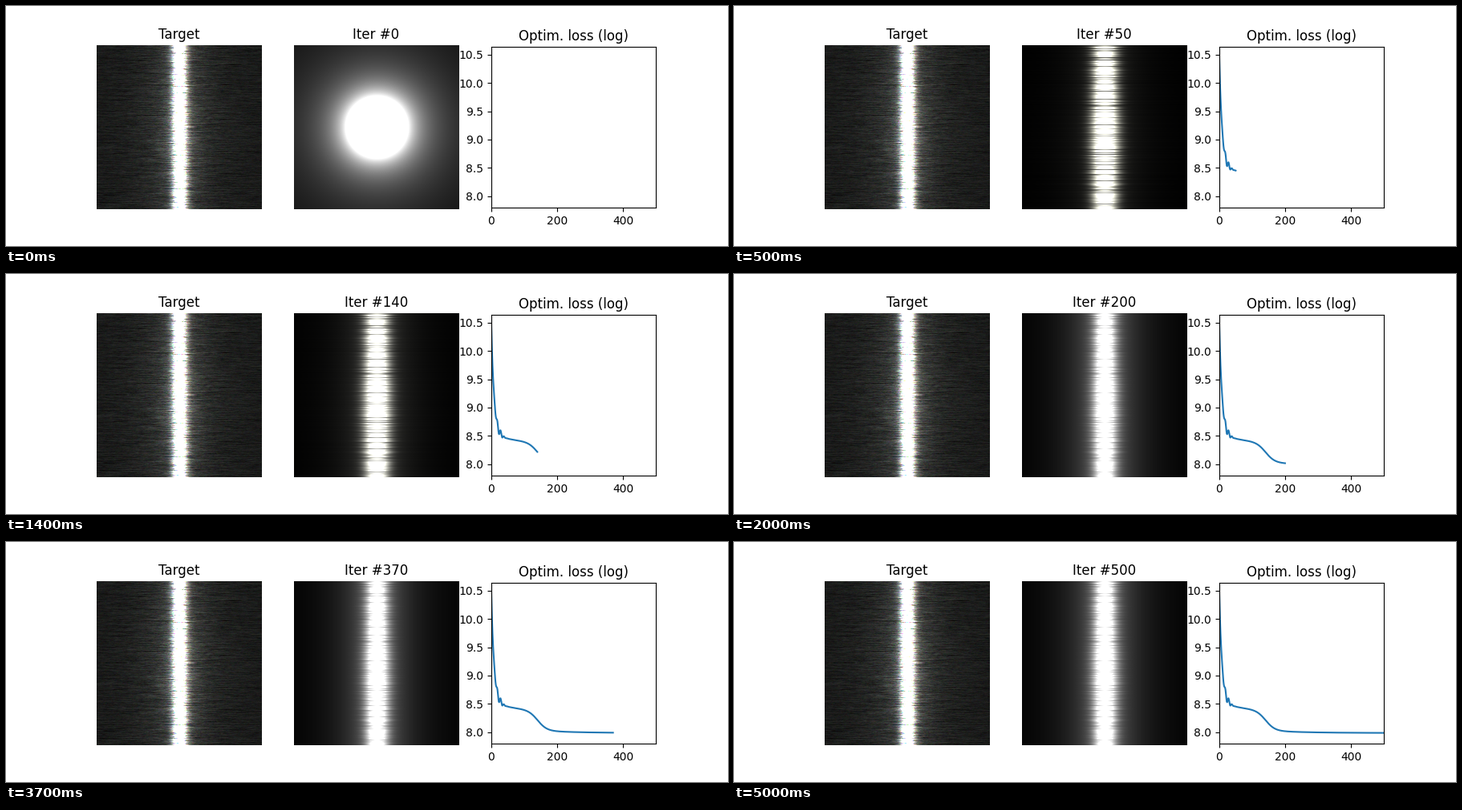
Write a matplotlib script that moves like this. It is 900x300 px and loops after 5.1 s.

```python
import numpy as np
import matplotlib.pyplot as plt
from matplotlib.animation import FuncAnimation

N = 205
FRAMES, STEP, INTERVAL = 51, 10, 100
BLUE = "#1f77b4"

rng = np.random.default_rng(7)
rows, cols = np.mgrid[0:N, 0:N].astype(float)
y = rows[:, :1]


def bell(x, spread):
    return np.exp(-(x / spread) ** 2)


def logistic(x):
    return 1 / (1 + np.exp(-x))


def streaks(length):
    """Unit-variance noise smeared along each row."""
    noise = rng.normal(size=(N, N + length - 1))
    kernel = np.ones(length) / np.sqrt(length)
    return np.array([np.convolve(r, kernel, "valid") for r in noise])


def brushed_target():
    """Brushed-metal highlight with streaks and faint coloured grain."""
    shade = 0.13 * streaks(20) + 0.08 * streaks(5)
    sway = 0.4 * rng.normal(size=(N, 1)) + 0.8 * (y / N - 0.5)
    hump = 0.85 + 0.3 * bell(y - 110, 60)
    channels = []
    for shift, tint in zip((0.2, 0, -0.2), (0.97, 1, 0.96)):
        d = np.abs(cols - 102.5 - sway - shift)
        glow = 0.095 + hump * (0.16 * np.exp(-d / 35) + 0.28 * np.exp(-d / 12))
        light = tint * glow + 1.2 * bell(d, 8)
        channels.append(light * (1 + shade + 0.08 * streaks(2)))
    return np.clip(np.dstack(channels), 0, 1)


# Grooves cut into the highlight: shallower and rarer around y = 118.
edge = np.clip(np.abs(y - 118) / 105, 0, 1)
depth = 0.9 * rng.random((N, 1)) ** (5 - 3.5 * edge)
width = 0.95 + 0.1 * bell(y - 120, 45) + 0.04 * rng.normal(size=(N, 1))


def render(it):
    """Highlight after `it` optimisation steps."""
    dx, dy = cols - 102.5, rows - 102.5
    d = np.abs(dx) / width
    soften = logistic((it - 150) / 12)
    groove = 1 - (0.95 - 0.3 * soften) * depth
    sharp = 1.6 * bell(d, 14) * groove + 0.22 * np.exp(-d / 30)
    soft = 1.0 * bell(d, 13) * groove + 0.55 * np.exp(-np.abs(dx) / 32)
    band = (1 - soften) * sharp + soften * soft

    # The round glow stretches upright while it gives way to the band.
    fade = np.exp(-it / 8)
    r = np.hypot(dx, dy * fade) + 1e-6
    disc = np.minimum((39 / r) ** 1.74, 1.6)
    gray = fade * disc + (1 - fade) * band
    blue = 1 - 0.07 * (1 - fade) * (1 - soften)
    return np.clip(np.dstack([gray, gray, gray * blue]), 0, 1)


def loss_at(t):
    """Steep ringing start, a plateau, one late drop and a slow tail."""
    start = 2.0 * np.exp(-t / 8.5)
    ringing = 0.07 * bell(t - 23, 12) * np.cos(2 * np.pi * (t - 28.5) / 10.3)
    drop = 0.36 * logistic((141 - t) / 14)
    tail = 0.16 * np.exp(-t / 110)
    return 7.985 + start + ringing + drop + tail


steps = np.arange(501)
loss = loss_at(steps)

fig, (ax_target, ax_iter, ax_loss) = plt.subplots(
    1, 3, figsize=(9, 3), dpi=100)

ax_target.imshow(brushed_target(), interpolation="nearest")
ax_target.set_title("Target", x=0.502)
ax_target.axis("off")

picture = ax_iter.imshow(render(0), interpolation="nearest")
title = ax_iter.set_title("Iter #0")
ax_iter.axis("off")

line, = ax_loss.plot([], [], color=BLUE)
ax_loss.set_title("Optim. loss (log)")
ax_loss.set_xlim(0, 500)
ax_loss.set_ylim(7.7985, 10.6385)
ax_loss.set_xticks([0, 200, 400])
ax_loss.set_box_aspect(0.979)


def update(i):
    it = i * STEP
    picture.set_data(render(it))
    title.set_text(f"Iter #{it}")
    shown = it + 1 if it else 0
    line.set_data(steps[:shown], loss[:shown])
    return picture, title, line


anim = FuncAnimation(fig, update, frames=FRAMES, interval=INTERVAL,
                     repeat=True, repeat_delay=0, blit=False)
plt.show()
```
